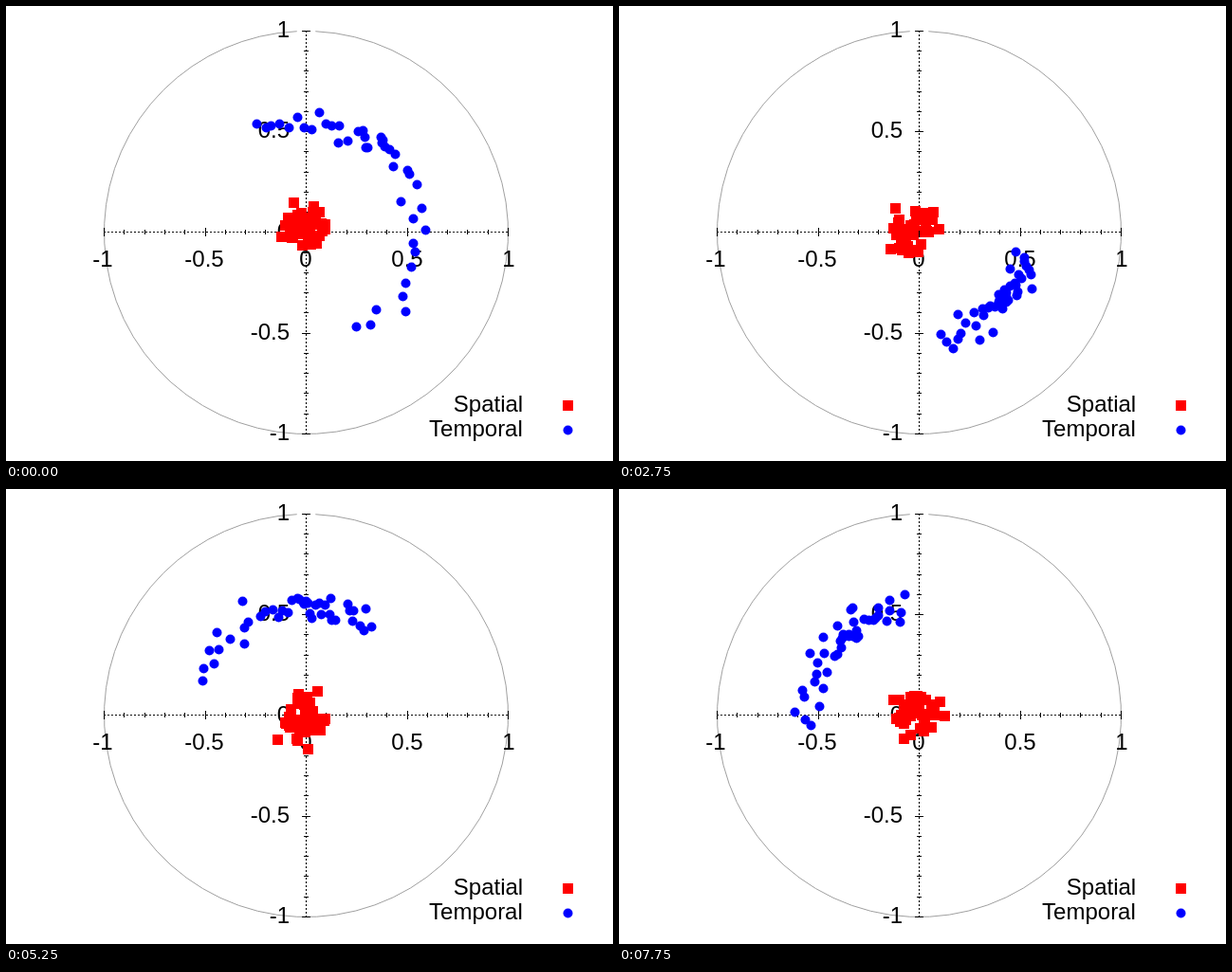
These frames come from a looping animation (640x480 px, 8000 ms). An HTML page with a canvas:

```html
<!DOCTYPE html>
<html lang="en">
<head>
<meta charset="utf-8">
<title>Spatial and temporal phases</title>
<style>
  html, body { margin: 0; width: 100%; height: 100%; overflow: hidden; background: #fff; }
  canvas { display: block; width: 640px; height: 480px; }
</style>
</head>
<body>
<canvas id="plot" width="640" height="480"></canvas>
<script>
const ctx = document.getElementById('plot').getContext('2d');
const CX = 316.5, CY = 238.5;
const STEP = 250, STEPS = 32, COUNT = 42;

// Key poses of the swinging arc, angles in degrees
const ARCS = [
  { at: 0, lo: 295, mid: 410, hi: 478 },
  { at: 5, lo: 159, mid: 197, hi: 218 },
  { at: 7, lo: 62, mid: 100, hi: 150 },
  { at: 10, lo: 200, mid: 248, hi: 298 },
  { at: 11, lo: 280, mid: 322, hi: 349 },
  { at: 15, lo: 334, mid: 382, hi: 434 },
  { at: 17, lo: 270, mid: 311, hi: 350 },
  { at: 21, lo: 412, mid: 451, hi: 523 },
  { at: 25, lo: 279, mid: 324, hi: 414 },
  { at: 30, lo: 408, mid: 445, hi: 492 },
  { at: 31, lo: 456, mid: 492, hi: 547 }
];

const mix = (a, b, t) => a + (b - a) * t;

function seeded(seed) {
  let s = seed;
  return () => {
    s = (s + 0x6d2b79f5) | 0;
    let t = Math.imul(s ^ (s >>> 15), 1 | s);
    t = (t + Math.imul(t ^ (t >>> 7), 61 | t)) ^ t;
    return ((t ^ (t >>> 14)) >>> 0) / 4294967296;
  };
}

function arcAt(step) {
  const k = Math.max(1, ARCS.findIndex(a => a.at >= step));
  const a = ARCS[k - 1], b = ARCS[k];
  const t = (step - a.at) / (b.at - a.at);
  return { lo: mix(a.lo, b.lo, t), mid: mix(a.mid, b.mid, t), hi: mix(a.hi, b.hi, t) };
}

// u runs from -1 to 1; points crowd towards the middle of the arc
function angleOn(arc, u) {
  const end = u < 0 ? arc.lo : arc.hi;
  return mix(arc.mid, end, Math.abs(u) ** 1.4) * Math.PI / 180;
}

function line(x1, y1, x2, y2) {
  ctx.beginPath();
  ctx.moveTo(x1, y1);
  ctx.lineTo(x2, y2);
  ctx.stroke();
}

function label(text, x, y, align) {
  ctx.textAlign = align;
  ctx.fillText(text, x, y);
}

function square(x, y) {
  ctx.fillStyle = '#f00';
  ctx.fillRect(Math.round(x) - 5, Math.round(y) - 5, 11, 11);
}

function dot(x, y) {
  ctx.fillStyle = '#00f';
  ctx.beginPath();
  ctx.arc(Math.round(x) + 0.5, Math.round(y) + 0.5, 5, 0, 2 * Math.PI);
  ctx.fill();
}

function drawAxes() {
  ctx.fillStyle = '#fff';
  ctx.fillRect(0, 0, 640, 480);
  ctx.lineWidth = 1;

  // The outline leaves a small gap at the top
  const gap = 0.046, top = -Math.PI / 2;
  ctx.strokeStyle = '#a0a0a0';
  ctx.beginPath();
  ctx.ellipse(CX, CY + 0.5, 213, 212.5, 0, top + gap, top + 2 * Math.PI - gap);
  ctx.stroke();

  ctx.strokeStyle = '#000';
  ctx.setLineDash([2, 2]);
  line(103, CY, 530, CY);
  line(CX, 452, CX, 26);
  ctx.setLineDash([]);

  for (let i = -10; i <= 10; i++) {
    const d = i % 5 ? 2.5 : 4.5;
    const x = Math.floor(CX + i * 21.3) + 0.5;
    const y = Math.floor(CY + 0.25 - i * 21.25) + 0.5;
    line(x, CY - d, x, CY + d);
    line(CX - d, y, CX + d, y);
  }

  ctx.fillStyle = '#000';
  ctx.font = '24px "Liberation Sans", Arial, sans-serif';
  for (let v = -1; v <= 1; v += 0.5) {
    label(String(v), 316 + v * 214, 275, 'center');
    label(String(v), 299, Math.floor(246 - v * 212.5), 'right');
  }
  label('Spatial', 545.2, 428, 'right');
  label('Temporal', 544.8, 454, 'right');
  square(592, 421);
  dot(592, 447);
}

function drawPoints(step) {
  const rnd = seeded(step * 7919 + 17);
  const bell = () => (rnd() + rnd() + rnd() - 1.5) * 2;

  const mx = CX + (rnd() - 0.5) * 8;
  const my = CY + (rnd() - 0.5) * 8;
  for (let i = 0; i < COUNT; i++) square(mx + bell() * 13, my + bell() * 13);

  const arc = arcAt(step);
  for (let i = 0; i < COUNT; i++) {
    const a = angleOn(arc, (i + 0.2 + 0.6 * rnd()) / COUNT * 2 - 1);
    const r = 116 + bell() * 8;
    dot(CX - 0.5 + r * Math.cos(a), CY - 0.5 - r * Math.sin(a));
  }
}

let shown = -1;
function tick() {
  const step = Math.floor(performance.now() / STEP) % STEPS;
  if (step !== shown) {
    shown = step;
    drawAxes();
    drawPoints(step);
  }
  requestAnimationFrame(tick);
}
tick();
</script>
</body>
</html>
```
